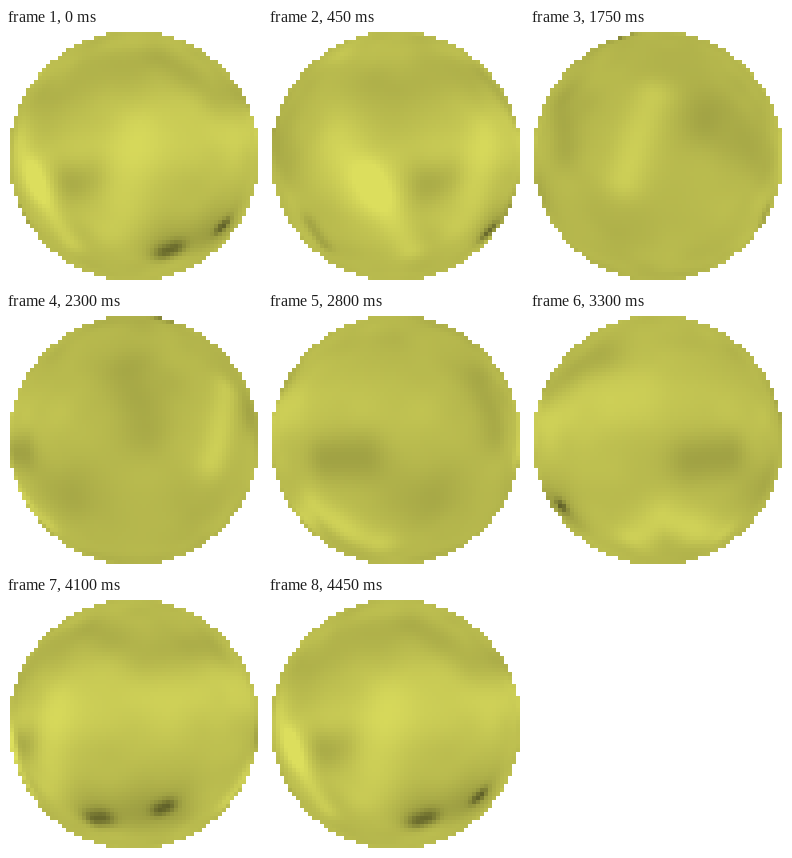
These frames come from a looping animation (256 by 256 pixels, 4.5 s). An HTML page with a canvas:

```html
<!DOCTYPE html>
<html lang="en">
<head>
<meta charset="utf-8">
<title>Rotating planet</title>
<style>
  html, body { margin: 0; width: 100%; height: 100%; overflow: hidden; background: #fff; }
  canvas { display: block; width: 100vw; height: 100vh; image-rendering: pixelated; }
</style>
</head>
<body>
<canvas id="planet" width="64" height="64"></canvas>
<script>
const SIZE = 64, RADIUS = 31.3;
const STEP = 50, STEPS = 90;
const WRAP = 4; // surface width; its height is 2

const wrap = d => d - WRAP * Math.round(d / WRAP);
const wave = (u, peak) => Math.cos((u - peak) * 2 * Math.PI / WRAP);
const mix = (a, b, t) => a + (b - a) * t;
const smooth = t => t * t * (3 - 2 * t);

// Seeded value noise that repeats around the planet, in -1..1
function makeNoise(seed, columns) {
  const rows = columns / 2 + 2;
  const grid = Array.from({ length: rows * columns }, () => {
    seed = (seed * 16807) % 2147483647;
    return seed / 1073741823.5 - 1;
  });
  const scale = columns / WRAP;
  return (u, v) => {
    const x = u * scale, y = (v + 1) * scale;
    const col = Math.floor(x), row = Math.floor(y);
    const at = (c, r) => grid[r * columns + ((c % columns) + columns) % columns];
    const tx = smooth(x - col), ty = smooth(y - row);
    return mix(mix(at(col, row), at(col + 1, row), tx),
               mix(at(col, row + 1), at(col + 1, row + 1), tx), ty);
  };
}
const coarse = makeNoise(71, 16), fine = makeNoise(29, 32);

// A soft stroke along a few surface points
const mark = (gain, radius, ...path) => ({ gain, radius, path });
const marks = [
  // bright plains
  mark(.09, .08, [-.5, .08], [-.42, .25], [-.33, .45]),
  mark(.07, .14, [.02, -.1], [-.12, .3]),
  mark(.11, .11, [.95, .48], [1.08, .35], [1.4, .52]),
  mark(.09, .09, [2.42, -.25], [2.31, .1]),
  mark(.1, .13, [3.36, -.08], [3.48, .14]),
  mark(.08, .12, [3.28, -.58]),
  // dark seas
  mark(-.11, .1, [-.28, .1], [-.18, .09]),
  mark(-.05, .14, [-.48, -.3], [-.12, -.42]),
  mark(-.06, .12, [.12, -.48], [.4, -.3], [.77, -.4]),
  mark(-.12, .14, [.18, .42], [.52, .4]),
  mark(-.1, .1, [1.2, .08], [1.38, .06]),
  mark(-.07, .14, [1.67, .25]),
  mark(-.08, .13, [1.92, -.28], [2, -.05]),
  mark(-.08, .14, [2.67, -.14], [3, .03]),
  // craters
  mark(-.27, .06, [.16, .48], [.2, .465]),
  mark(-.27, .045, [.48, .4], [.51, .385]),
  mark(-.1, .06, [3.14, .36], [3.19, .5]),
  mark(-.25, .08, [2.17, -.87])
];

function distance(u, v, path) {
  let best = Infinity;
  path.forEach(([au, av], i) => {
    const [bu, bv] = path[i + 1] || path[i];
    const du = wrap(u - au), dv = v - av;
    const su = bu - au, sv = bv - av;
    const length = su * su + sv * sv || 1;
    const t = Math.max(0, Math.min(1, (du * su + dv * sv) / length));
    best = Math.min(best, Math.hypot(du - su * t, dv - sv * t));
  });
  return best;
}

function brightness(u, v) {
  // A winding bright belt, fading on one side of the planet
  const belt = (v + .02 + .12 * wave(u, .95)) / .18;
  let sum = .83 + .015 * wave(u, .2)
    + (.05 + .03 * wave(u, .5)) * Math.exp(-belt * belt)
    + .022 * coarse(u, v) + .014 * fine(u, v);
  for (const { gain, radius, path } of marks) {
    const d = distance(u, v, path) / radius;
    if (d < 2.6) sum += gain * Math.exp(-d * d);
  }
  return Math.min(sum, 1);
}

// Visible cells with their place on the unrolled surface
const cells = [];
for (let row = 0; row < SIZE; row++) {
  for (let col = 0; col < SIZE; col++) {
    const x = (col + .5 - SIZE / 2) / RADIUS;
    const y = (row + .5 - SIZE / 2) / RADIUS;
    const rest = 1 - x * x - y * y;
    if (rest < 0) continue;
    const depth = 1 + Math.sqrt(rest);
    cells.push({ at: (row * SIZE + col) * 4, u: x / depth, v: y / depth });
  }
}

const ctx = document.getElementById('planet').getContext('2d');
const image = ctx.createImageData(SIZE, SIZE);

function draw(step) {
  const shift = WRAP * step / STEPS;
  for (const { at, u, v } of cells) {
    const b = brightness(u - shift, v);
    image.data[at] = 220 * b;
    image.data[at + 1] = 222 * b;
    image.data[at + 2] = 93 * b;
    image.data[at + 3] = 255;
  }
  ctx.putImageData(image, 0, 0);
}

const start = performance.now();
let shown = -1;
function tick() {
  const step = Math.floor((performance.now() - start) / STEP) % STEPS;
  if (step !== shown) draw(shown = step);
  requestAnimationFrame(tick);
}
tick();
</script>
</body>
</html>
```
